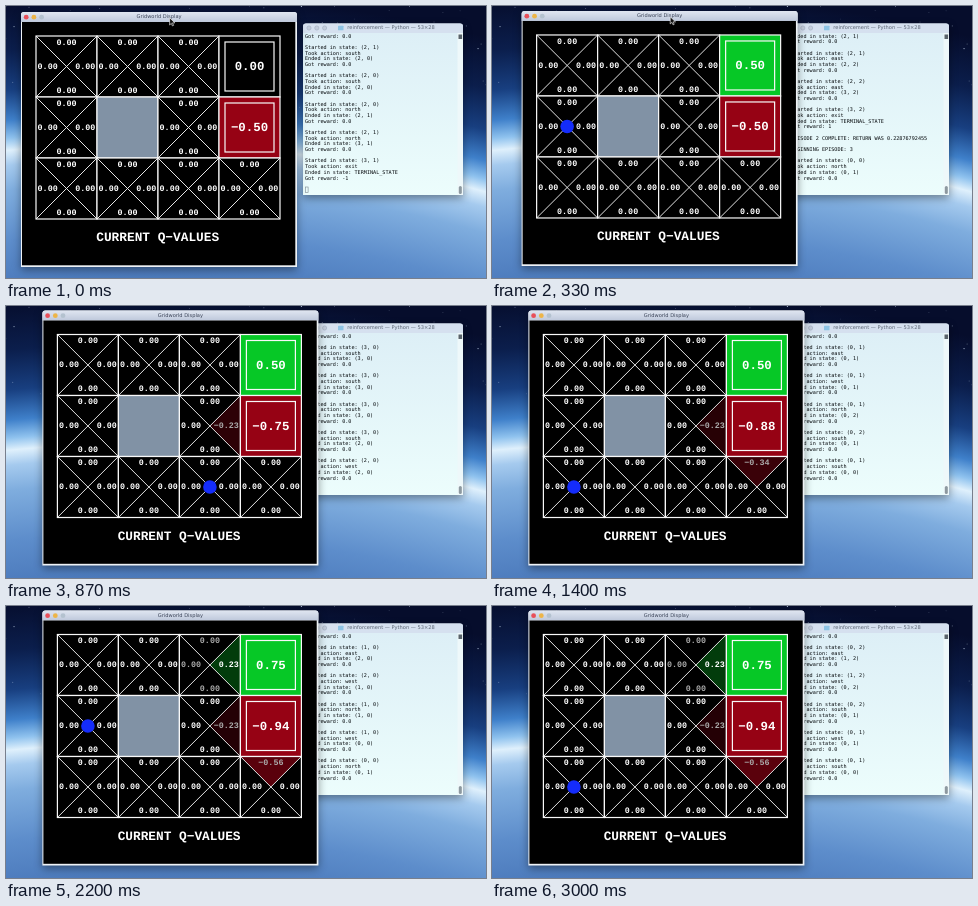
Write an HTML page that moves like this. It is 480 by 272 pixels and loops after 3070 ms.

```html
<!DOCTYPE html>
<html lang="en">
<head>
<meta charset="utf-8">
<title>Gridworld Q-learning</title>
<style>
  html, body { margin: 0; width: 100%; height: 100%; overflow: hidden; background: #0a1c3a; }
  svg {
    display: block; width: 100vw; height: 100vh;
    text-rendering: geometricPrecision;
    background: radial-gradient(circle at 130px 1438px,
      #4a78ba 1160px, #5d8dcb 1210px, #7fadde 1260px, #a5caee 1285px,
      #dff0fc 1300px, #8fc2ee 1312px, #3f80ca 1330px,
      #183f80 1360px, #0b1e4c 1400px, #060d2c 1450px);
  }
  text { dominant-baseline: central; }
  .win { filter: drop-shadow(0 3px 4px rgba(0, 0, 0, .4)); }
  .title { font: 5.1px "DejaVu Sans", sans-serif; fill: #3b4458; text-anchor: middle; }
  .log { font: 5.15px "DejaVu Sans Mono", monospace; fill: #05090c; }
  .q, .exit, .caption { font: bold 8.4px "Liberation Mono", monospace; fill: #fff; text-anchor: middle; }
  .q.w { text-anchor: start; }
  .q.e { text-anchor: end; }
  .exit { font-size: 12.4px; }
  .caption { font-size: 12.8px; }
  .line { fill: none; stroke: #f8f8f8; stroke-width: 1.2; }
  .thin { fill: none; stroke: #f0f0f0; stroke-width: .95; }
</style>
</head>
<body>
<svg viewBox="0 0 480 272" preserveAspectRatio="none">
  <defs>
    <linearGradient id="bar" x2="0" y2="1">
      <stop stop-color="#e0e6f1"/><stop offset="1" stop-color="#bec8db"/>
    </linearGradient>
    <linearGradient id="paper" x2="0" y2="1">
      <stop stop-color="#dceef6"/><stop offset="1" stop-color="#ecfdfc"/>
    </linearGradient>
  </defs>
  <g id="stars" fill="#dcecff"/>
  <g class="win">
    <path d="M297 189V20.5q0-3 3-3H454q3 0 3 3V189z" fill="url(#paper)"/>
    <path d="M297 27V20.5q0-3 3-3H454q3 0 3 3V27z" fill="#d5e0ef"/>
    <g fill="#c3cddc" stroke="#98a5b8" stroke-width=".5">
      <circle cx="303" cy="22" r="2.1"/><circle cx="310.8" cy="22" r="2.1"/><circle cx="318.6" cy="22" r="2.1"/>
    </g>
    <rect x="332" y="19.7" width="5.5" height="4.6" rx=".6" fill="#8dc3e4"/>
    <text class="title" x="385" y="22" style="fill:#5c6675">reinforcement — Python — 53×28</text>
    <rect x="451.5" y="27" width="5.5" height="162" fill="#eef8fa"/>
    <rect x="452.5" y="28.5" width="3.6" height="4.5" fill="#59636b"/>
    <rect x="452.8" y="180" width="3" height="8" rx="1.5" fill="#8d989f"/>
  </g>
  <g id="log"/>
  <rect x="299.3" y="181" width="2.8" height="5.6" fill="none" stroke="#7c878e" stroke-width=".6"/>
  <g id="app">
    <g class="win">
      <path d="M15 261V9q0-3 3-3H288q3 0 3 3V261z" fill="#eef2f6"/>
      <path d="M15 16V9q0-3 3-3H288q3 0 3 3V16z" fill="url(#bar)"/>
      <rect x="16" y="16" width="273.3" height="243.3"/>
    </g>
    <circle cx="20.2" cy="11.2" r="2.4" fill="#e8505a"/>
    <circle cx="27.9" cy="11.2" r="2.4" fill="#edb548"/>
    <circle cx="35.6" cy="11.2" r="2.4" fill="#b4c2cf"/>
    <text class="title" x="153" y="11.2">Gridworld Display</text>
    <g id="grid"/>
    <circle id="agent" r="6.8" fill="#142cfb"/>
    <text class="caption" x="151.7" y="231.5">CURRENT Q−VALUES</text>
    <path id="pointer" d="M163.6 11.8v7.2l1.7-1.6 1.1 2.5 1.2-.5-1.1-2.5h2.4z" fill="#111" stroke="#fff" stroke-width=".6"/>
  </g>
</svg>
<script>
const $ = id => document.getElementById(id);

function add(parent, tag, attrs) {
  const el = document.createElementNS('http://www.w3.org/2000/svg', tag);
  for (const name in attrs) el.setAttribute(name, attrs[name]);
  return parent.appendChild(el);
}

// --- Learning run -------------------------------------------------------
const DIRS = { n: [0, 1], s: [0, -1], w: [-1, 0], e: [1, 0] };
const NAMES = { n: 'north', s: 'south', w: 'west', e: 'east', x: 'exit' };
const EXITS = { '3,2': 1, '3,1': -1 };
const WALL = '1,1';
const ALPHA = 0.5, GAMMA = 0.9;

// One letter per action; "n/e" means north was chosen but the move slipped east.
const RUN = 's ssn n/e x nwneswsseesn e/n ex n senewenwex nsesensewee sss s/w w/s ' +
  'wensenx nnewnsswewnwe ewnss ewnneewwwssnnensen nssns senx nneeex ' +
  'eewnwnenewswe ssews nseenswswwnnsenesnwwn ewsws';

function move([x, y], dir) {
  const next = [x + DIRS[dir][0], y + DIRS[dir][1]];
  const inside = next[0] >= 0 && next[0] < 4 && next[1] >= 0 && next[1] < 3;
  return inside && String(next) !== WALL ? next : [x, y];
}

const actionsAt = pos => EXITS[pos] ? ['x'] : Object.keys(DIRS);
const valueOf = (q, pos, a) => q[pos + a] || 0;
const best = (q, pos) => Math.max(...actionsAt(pos).map(a => valueOf(q, pos, a)));

function simulate() {
  const lines = [], states = [];
  let q = {}, pos = [2, 2], episode = 1, moves = 0, last = 0;
  for (const [, action, slip] of RUN.matchAll(/(\w)(?:\/(\w))?/g)) {
    if (!pos) {
      const total = Number((last * GAMMA ** moves).toPrecision(12));
      lines.push(`EPISODE ${episode} COMPLETE: RETURN WAS ${total}`, '', `BEGINNING EPISODE: ${++episode}`, '');
      pos = [0, 0];
      moves = 0;
    }
    const from = pos, leaving = action === 'x';
    const reward = leaving ? EXITS[from] : 0;
    pos = leaving ? null : move(from, slip || action);
    lines.push(
      `Started in state: (${from.join(', ')})`,
      `Took action: ${NAMES[action]}`,
      `Ended in state: ${pos ? `(${pos.join(', ')})` : 'TERMINAL_STATE'}`,
      `Got reward: ${leaving ? reward : '0.0'}`, '');
    const old = valueOf(q, from, action);
    const future = pos ? GAMMA * best(q, pos) : 0;
    q = { ...q, [from + action]: old + ALPHA * (reward + future - old) };
    states.push({ q, pos, end: lines.length });
    if (leaving) last = reward; else moves++;
  }
  return { lines, states };
}

// --- Scene --------------------------------------------------------------
const CELL = 61, HALF = CELL / 2, LEFT = 30, TOP = 30;
const ROWS = 27, PITCH = 5.68;
const centre = ([x, y]) => [LEFT + (x + 0.5) * CELL, TOP + (2.5 - y) * CELL];
const square = (cx, cy, half) => ({ x: cx - half, y: cy - half, width: half * 2, height: half * 2 });

// Each part pairs a shaded area and a label with one state-action value.
const parts = [];

function buildCell(pos) {
  const grid = $('grid'), [cx, cy] = centre(pos), box = square(cx, cy, HALF);
  if (String(pos) === WALL) {
    add(grid, 'rect', { ...box, class: 'line', style: 'fill:#8192a5' });
    return;
  }
  if (EXITS[pos]) {
    const area = add(grid, 'rect', box);
    add(grid, 'rect', { ...square(cx, cy, 24.5), class: 'line' });
    parts.push({ pos, action: 'x', area, label: add(grid, 'text', { x: cx, y: cy + 0.5, class: 'exit' }) });
  } else {
    const areas = Object.entries(DIRS).map(([action, [dx, dy]]) => {
      const ax = cx + HALF * (dx - dy), ay = cy - HALF * (dy + dx);
      const bx = cx + HALF * (dx + dy), by = cy - HALF * (dy - dx);
      return { action, dx, dy, area: add(grid, 'path', { d: `M${cx} ${cy}L${ax} ${ay}L${bx} ${by}z` }) };
    });
    add(grid, 'path', {
      class: 'thin',
      d: `M${box.x} ${box.y}l${CELL} ${CELL}M${box.x} ${box.y + CELL}l${CELL} ${-CELL}`
    });
    for (const { action, dx, dy, area } of areas) {
      const label = add(grid, 'text', {
        x: cx + dx * (HALF - 1.6), y: cy - dy * 24 + 0.3, class: `q ${action}`
      });
      parts.push({ pos, action, area, label });
    }
  }
  add(grid, 'rect', { ...box, class: 'line' });
}

function buildStars() {
  let seed = 11;
  const rnd = () => (seed = seed * 16807 % 2147483647) / 2147483647;
  for (let i = 0; i < 90; i++) {
    add($('stars'), 'circle', {
      cx: rnd() * 480, cy: rnd() ** 1.5 * 110, r: 0.25 + rnd() * 0.4, opacity: 0.3 + rnd() * 0.5
    });
  }
}

buildStars();
for (let y = 2; y >= 0; y--) for (let x = 0; x < 4; x++) buildCell([x, y]);
const rows = Array.from({ length: ROWS }, (_, i) =>
  add($('log'), 'text', { x: 299, y: 30.5 + i * PITCH, class: 'log' }));
const { lines, states } = simulate();

function shade(v, lo, hi) {
  const [rgb, k] = v < 0 ? [[150, 2, 20], v / lo] : [[6, 200, 38], hi ? v / hi : 0];
  return `rgb(${rgb.map(c => Math.round(c * k))})`;
}

// --- Playback -----------------------------------------------------------
const LOOP = 3070, FPS = 15, START = 5, SPEED = 3.2, DRAG_STEPS = 8;

function draw(step) {
  const { q, pos, end } = states[Math.min(states.length - 1, START + Math.round(step * SPEED))];
  const values = Object.values(q), lo = Math.min(0, ...values), hi = Math.max(0, ...values);
  for (const { pos: cell, action, area, label } of parts) {
    const v = valueOf(q, cell, action);
    area.style.fill = shade(v, lo, hi);
    label.textContent = v.toFixed(2).replace('-', '−');
    label.style.fill = v === best(q, cell) ? '#fff' : '#aaa';
  }
  rows.forEach((row, i) => row.textContent = lines[end - ROWS + i] || '');

  const p = Math.min(1, step / DRAG_STEPS), drag = p * p * (3 - 2 * p);
  $('app').setAttribute('transform', `translate(${21.4 * drag} ${-1.5 * drag})`);
  $('pointer').style.display = step <= DRAG_STEPS ? '' : 'none';

  $('agent').style.display = pos ? '' : 'none';
  if (pos) {
    const [cx, cy] = centre(pos);
    $('agent').setAttribute('cx', cx);
    $('agent').setAttribute('cy', cy);
  }
}

const began = performance.now();
let shown = -1;
function tick() {
  const t = (performance.now() - began) % LOOP;
  const step = Math.min(45, Math.floor(t * FPS / 1000 + 0.06));
  if (step !== shown) draw(shown = step);
  requestAnimationFrame(tick);
}
tick();
</script>
</body>
</html>
```
